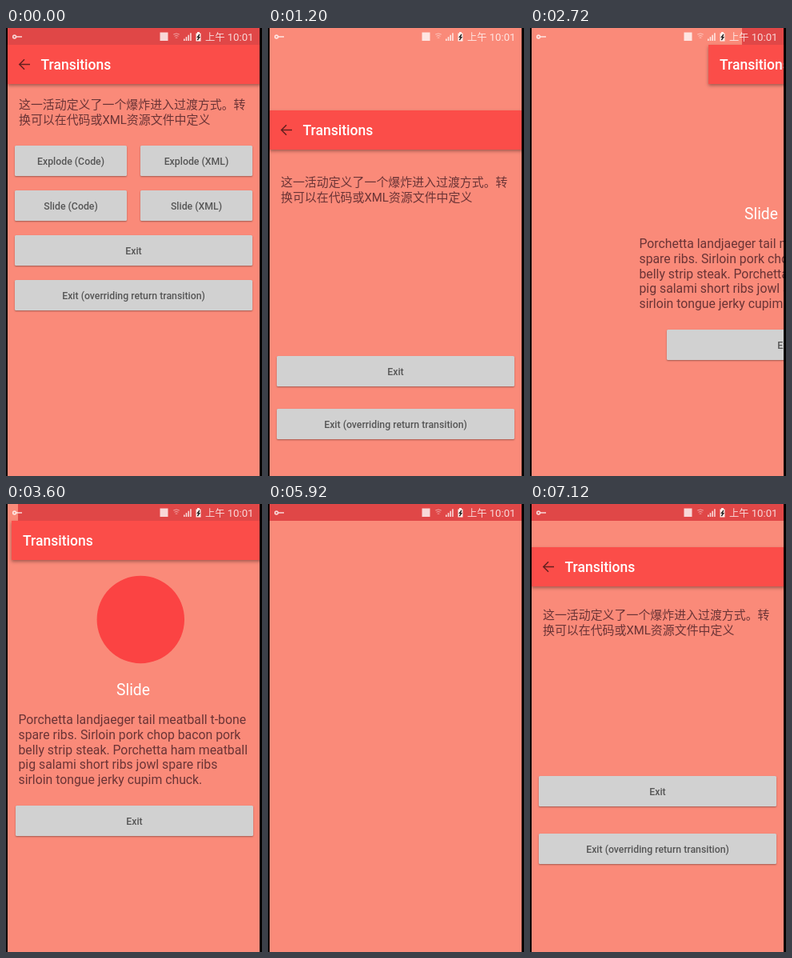
Write an HTML page with a canvas that moves like this. It is 320 px wide and 560 px high and loops after 7200 ms.

```html
<!DOCTYPE html>
<html lang="zh-CN">
<head>
<meta charset="utf-8">
<title>Transitions</title>
<style>
html, body { margin: 0; width: 100%; height: 100%; overflow: hidden; background: #000; }
canvas { display: block; width: 320px; height: 560px; }
</style>
</head>
<body>
<canvas id="stage" width="320" height="560"></canvas>
<script>
const ctx = document.getElementById('stage').getContext('2d');
const LOOP = 7200, STEP = 80;
const SLIDE = 1587, ENTER = 1236;   // durations in ms
const WIDTH = 315, HEIGHT = 560;    // screen size and slide distances
const BACKGROUND = '#fa8a79', BAR = '#fb4d49', STATUS = '#e04747';
const BODY = '#6b3436', ICON = 'rgba(255,255,255,.78)';
const SANS = 'Roboto, "Noto Sans CJK SC", "Noto Sans CJK", sans-serif';

const clamp = v => Math.min(1, Math.max(0, v));
const accelerate = (t, start, distance) => distance * clamp((t - start) / SLIDE) ** 2;
const decelerate = (t, end, duration, distance) => distance * clamp((end - t) / duration) ** 2;

// Moves land on whole pixels so that edges stay sharp.
function at(dx, dy, draw) {
  ctx.save();
  ctx.translate(Math.round(dx), Math.round(dy));
  draw();
  ctx.restore();
}

function clipped(x, y, w, h, draw) {
  ctx.save();
  ctx.beginPath();
  ctx.rect(x, y, w, h);
  ctx.clip();
  draw();
  ctx.restore();
}

function rect(x, y, w, h, color) {
  ctx.fillStyle = color;
  ctx.fillRect(x, y, w, h);
}

function shadowed(alpha, blur, dy, draw) {
  ctx.save();
  ctx.shadowColor = `rgba(0,0,0,${alpha})`;
  ctx.shadowBlur = blur;
  ctx.shadowOffsetY = dy;
  draw();
  ctx.restore();
}

function text(str, x, y, size, color, weight = 400, align = 'left') {
  ctx.font = `${weight} ${size}px ${SANS}`;
  ctx.textAlign = align;
  ctx.fillStyle = color;
  ctx.fillText(str, x, y);
}

function stroke(points, color, width) {
  ctx.beginPath();
  points.forEach(([x, y]) => ctx.lineTo(x, y));
  ctx.strokeStyle = color;
  ctx.lineWidth = width;
  ctx.stroke();
}

function button(label, x, y, w) {
  shadowed(.35, 2, 1, () => {
    ctx.fillStyle = '#d1d1d1';
    ctx.beginPath();
    ctx.roundRect(x, y, w, 38, 1.5);
    ctx.fill();
  });
  text(label, x + w / 2, y + 24, 12.3, '#565656', 500, 'center');
}

function toolbar(titleX) {
  shadowed(.35, 4, 2, () => rect(2, 21, WIDTH + 2, 49, BAR));
  text('Transitions', titleX, 52, 17.5, '#fff', 500);
}

function backArrow() {
  stroke([[30, 45.5], [17, 45.5]], '#64201f', 1.5);
  stroke([[23, 39.2], [16.8, 45.5], [23, 51.8]], '#64201f', 1.5);
}

function homeScreen(t) {
  const leaving = t < 2300;
  const shift = (start, end) =>
    leaving ? accelerate(t, start, HEIGHT) : decelerate(t, end, SLIDE, HEIGHT);

  // Button rows clip their children while these slide out.
  const row = (y, name, dy) => clipped(2, y - 9, WIDTH, 56, () => at(0, dy, () => {
    button(`${name} (Code)`, 11, y, 140);
    button(`${name} (XML)`, 168, y, 140);
  }));
  row(147, 'Explode', shift(408, 7660));
  row(203, 'Slide', shift(365, 7747));

  at(0, shift(541, 7560), () => {
    text('这一活动定义了一个爆炸进入过渡方式。转', 16, 101.2, 14.93, BODY);
    text('换可以在代码或XML资源文件中定义', 16, 120, 14.93, BODY);
  });
  at(0, shift(377, 7725), () => button('Exit', 11, 259, 297));
  at(0, shift(348, 7779), () => button('Exit (overriding return transition)', 11, 315, 297));
  at(0, shift(592, 7505), () => {
    toolbar(43.5);
    backArrow();
  });
}

function detailScreen(t) {
  const shift = (end, start) =>
    Math.max(decelerate(t, end, ENTER, WIDTH), accelerate(t, start, WIDTH));

  at(shift(3800, 3560), 0, () => {
    ctx.fillStyle = '#fb4343';
    ctx.beginPath();
    ctx.arc(160.3, 144.5, 54.7, 0, 7);
    ctx.fill();
  });
  at(shift(3513, 3570), 0, () => text('Slide', 159, 239, 19.3, '#fff', 400, 'center'));
  at(shift(3486, 3553), 0, () => [
    'Porchetta landjaeger tail meatball t-bone',
    'spare ribs. Sirloin pork chop bacon pork',
    'belly strip steak. Porchetta ham meatball',
    'pig salami short ribs jowl spare ribs',
    'sirloin tongue jerky cupim chuck.'
  ].forEach((line, i) => text(line, 15.5, 275.3 + i * 18.6, 15.8, BODY)));
  at(shift(3602, 3498), 0, () => button('Exit', 11, 377, 297));
  at(shift(3755, 3898), 0, () => toolbar(16));
}

function statusBackground(t) {
  const dy = t < 2300 ? accelerate(t, 620, HEIGHT) : 0;
  const dx = t < 2300 ? 0 : decelerate(t, 3850, ENTER, WIDTH);
  clipped(2, 0, WIDTH, 21, () => at(dx, dy, () => rect(2, 0, WIDTH, 21, STATUS)));
}

function statusIcons() {
  // key
  ctx.beginPath();
  ctx.arc(10.6, 11, 1.9, 0, 7);
  ctx.strokeStyle = ICON;
  ctx.lineWidth = 1.6;
  ctx.stroke();
  rect(13, 10.2, 7, 1.5, ICON);

  rect(192.5, 5.5, 10, 10.5, ICON);

  // wireless arcs
  for (const r of [2.5, 5, 7.5]) {
    ctx.beginPath();
    ctx.arc(213, 14.5, r, -2.1, -1.04);
    ctx.strokeStyle = 'rgba(255,255,255,.5)';
    ctx.lineWidth = 1;
    ctx.stroke();
  }
  for (let i = 0; i < 4; i++) rect(222 + i * 2.7, 13.5 - i * 2.4, 1.6, 2.5 + i * 2.4, ICON);

  // battery with bolt
  rect(237.5, 6.5, 6, 10, '#fff0ec');
  rect(239, 5, 3, 2, '#fff0ec');
  stroke([[242, 8], [239.5, 11.3], [241.8, 11.5], [239.3, 15]], '#222', 1.4);

  text('上午', 249, 15.6, 12.3, ICON);
  text('10:01', 309.5, 15.6, 13.2, ICON, 400, 'right');
}

function render(t) {
  rect(0, 0, 320, 560, '#000');
  clipped(2, 0, WIDTH, HEIGHT, () => {
    rect(2, 0, WIDTH, HEIGHT, BACKGROUND);
    if (t < 2240 || t > 5490) homeScreen(t);
    else detailScreen(t);
    statusBackground(t);
    statusIcons();
  });
}

function tick(now) {
  render(Math.floor(now % LOOP / STEP) * STEP);
  requestAnimationFrame(tick);
}
render(0);
requestAnimationFrame(tick);
</script>
</body>
</html>
```
